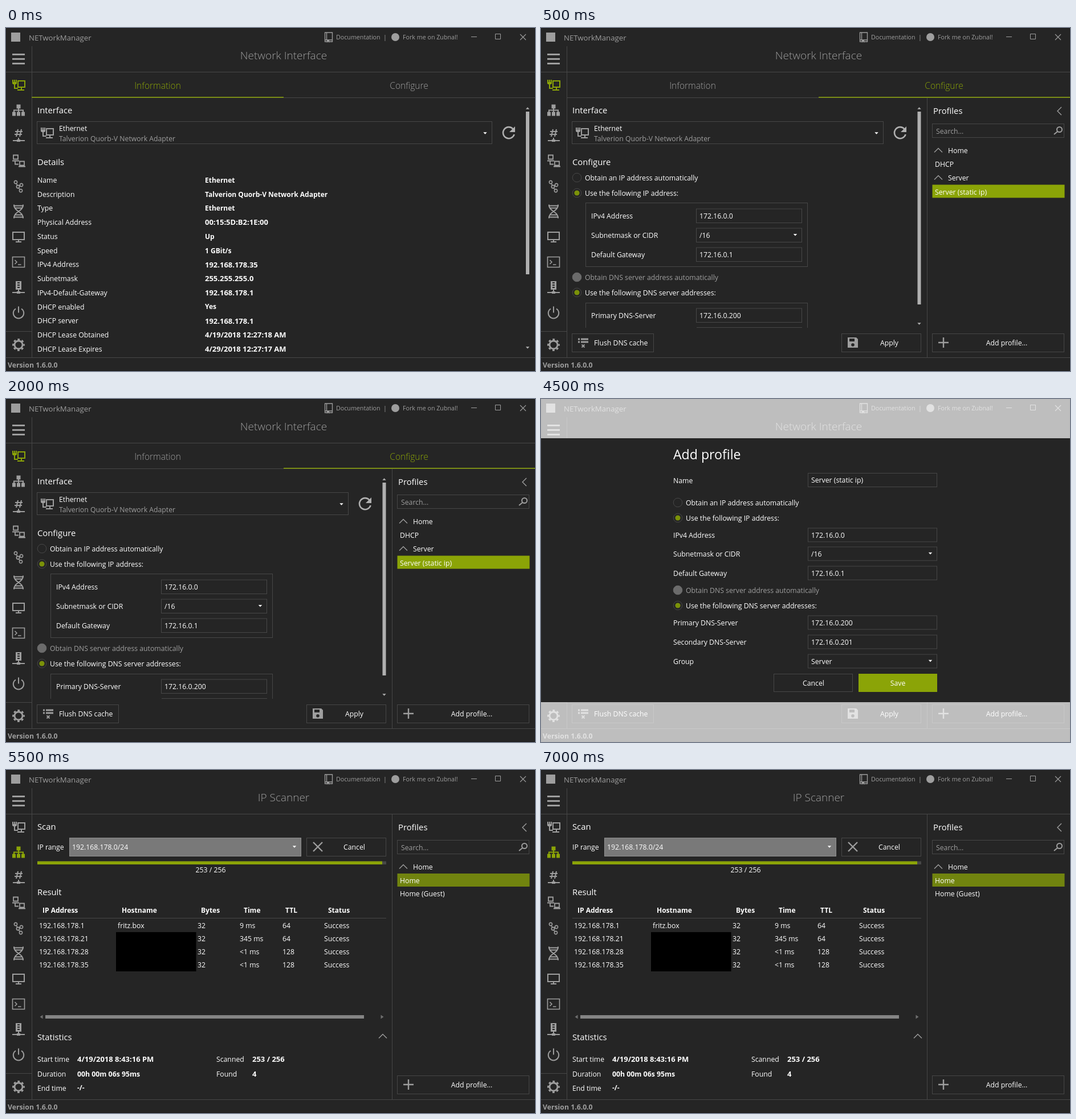
An HTML page that plays this animation: 928 by 603 pixels, repeating every 8 s.

```html
<!DOCTYPE html>
<html lang="en">
<head>
<meta charset="utf-8">
<title>NETworkManager</title>
<style>
  html, body { margin: 0; width: 100%; height: 100%; overflow: hidden; background: #252525; }
  svg { display: block; width: 100%; height: 100%; font-family: "Open Sans", "Noto Sans", sans-serif; }
  text { white-space: pre; }
</style>
</head>
<body>
<svg id="stage" viewBox="0 0 928 603"></svg>
<script>
const BG = '#252525', LINE = '#474747', GRAY = '#9e9e9e', WHITE = '#fff';
const LIME = '#8ba407', LIME_DIM = '#71840f', THUMB = '#b0b0b0';

// y is the vertical middle of the capitals
const text = (x, y, s, { size = 12.25, fill = WHITE, weight = 400, anchor = 'start' } = {}) =>
  `<text x="${x}" y="${y + size * .37}" font-size="${size}" fill="${fill}" font-weight="${weight}" text-anchor="${anchor}">${s.replace('<', '&lt;')}</text>`;
const bold = (x, y, s, size = 12) => text(x, y, s, { size, weight: 700 });
const center = (x, y, s, options) => text(x, y, s, { anchor: 'middle', ...options });
const heading = (x, y, s) => text(x, y, s, { size: 14.8 });
const fillRect = (x1, y1, x2, y2, fill) =>
  `<rect x="${x1}" y="${y1}" width="${x2 - x1}" height="${y2 - y1}" fill="${fill}"/>`;
const box = (x1, y1, x2, y2, fill = 'none', stroke = LINE) =>
  `<rect x="${x1 - .5}" y="${y1 + .5}" width="${x2 - x1}" height="${y2 - y1}" fill="${fill}" stroke="${stroke}"/>`;
const hLine = (x1, x2, y) => fillRect(x1, y, x2, y + 1, LINE);
const vLine = (x, y1, y2) => fillRect(x, y1, x + 1, y2, LINE);
const path = (x, y, d, color = GRAY, width = 2, fill = 'none') =>
  `<path transform="translate(${x} ${y})" d="${d}" fill="${fill}" stroke="${color}" stroke-width="${width}"/>`;
const solid = (x, y, d, color = GRAY) => path(x, y, d, 'none', 0, color);
const ring = (x, y, r = 2.6) => `M${x - r} ${y}a${r} ${r} 0 1 0 ${2 * r} 0a${r} ${r} 0 1 0 ${-2 * r} 0`;

// Each icon: [stroked path, filled path, stroke width]
const icons = {
  adapter: ['M-1-7H11V4H-1zM5 4V8M-2 9H10M-10-9V-3H-4V-9M-7-9V6H-1', 'M-10-5H-4V-1H-10z'],
  sitemap: ['M0-4V4M-8 4V0H8V4', 'M-3.5-10h7v7h-7zM-11 3h6v7h-6zM-3 3h6v7h-6zM5 3h6v7h-6z'],
  hash: ['M-1-11L-4 2M5-11L2 2M-6-7H7M-7-2H6M-10 9H11M0 4V8', 'M-3 7h6v4h-6z'],
  computers: ['M-9-10H-1V-3H-9zM-11 0H1M2 1H10V8H2zM0 10H12M-6 1V6H0', '', 1.8],
  graph: [ring(-5, -7) + ring(5, -2) + ring(-1, 1) + ring(4, 8) + 'M-4-5L-2-1M1 0L3-1M0 3L2.5 6', '', 1.6],
  dna: ['M-8-12C-8 1 8-1 8 12M8-12C8 1-8-1-8 12M-9-10H9M-6-6H6M-6 6H6M-9 10H9', ''],
  monitor: ['M-10-8H10V5H-10zM0 5V9M-5 9H5', ''],
  terminal: ['M-10.5-9H10.5V9H-10.5zM-6.5-3.5L-3 0L-6.5 3.5M-1 4.5H4.5', '', 1.6],
  server: ['M0 2V8M-11 9H11', 'M-5-11H5V4H-5zM-2-9v2h4v-2zM-2-5v2h4v-2zM-2-1v2h4v-2zM-3 7h6v4h-6z'],
  power: ['M-5-7A9.2 9.2 0 1 0 5-7M0-11V0', '']
};
const icon = (name, x, y, color = GRAY) => {
  const [lines, shapes, width] = icons[name];
  return path(x, y, lines, color, width) + solid(x, y, shapes, color);
};

const gear = (x, y) => `<g transform="translate(${x} ${y})" fill="none" stroke="${GRAY}" stroke-width="2.8">
  <circle r="7"/><circle r="9.5" stroke-dasharray="3.8 3.66" stroke-dashoffset="1.9"/></g>`;
const chevronUp = (x, y) => path(x, y, 'M-7 3.5L0-3.5L7 3.5', GRAY, 1.4);
const arrowDown = (x, y, color = WHITE) => solid(x, y, 'M-3.2-1.7H3.2L0 1.8z', color);
const arrowUp = (x, y, color = THUMB) => solid(x, y, 'M-3.2 1.8H3.2L0-1.7z', color);
const refresh = (x, y) => path(x, y, 'M7.5-6.5A10 10 0 1 0 9.6 3', THUMB, 2.6) + solid(x, y, 'M11-11V-1H1z', THUMB);

const input = (x1, y1, x2, y2, s, drop) =>
  box(x1, y1, x2, y2) + text(x1 + 5, (y1 + y2) / 2 + .5, s) + (drop ? arrowDown(x2 - 12, (y1 + y2) / 2) : '');
const button = (x1, y1, x2, y2, s, textX, fill, stroke) =>
  box(x1, y1, x2, y2, fill, stroke) + center(textX, (y1 + y2) / 2 + .5, s);

function radio(x, y, s, state) {
  const off = state === 'disabled';
  return `<circle cx="${x}" cy="${y}" r="7.8" fill="${off ? '#6b6b6b' : 'none'}" stroke="${off ? '#6b6b6b' : LINE}"/>` +
    (state === 'on' ? `<circle cx="${x}" cy="${y}" r="4.6" fill="#7b9209"/>` : '') +
    text(x + 14, y + .7, s, { fill: off ? GRAY : WHITE });
}

function vScroll(x, top, bottom, end) {
  return arrowUp(x, 141) + fillRect(x - 3, top, x + 3, bottom, THUMB) + arrowDown(x, end, THUMB);
}

function frame(title, active) {
  const label = { size: 10.7, fill: GRAY };
  return fillRect(0, 0, 928, 603, BG) + box(1, 0, 928, 602, 'none', '#1b1b1b') +
    fillRect(9, 8, 25, 24, GRAY) +
    text(40, 17, 'NETworkManager', { size: 13.2, fill: GRAY }) +
    path(566, 16, 'M-6.5-8H6.5V5H-6.5zM-6.5 5V8H-3M1 8H6.5V5M-3.5-8V5', GRAY, 1.3) + solid(566, 16, 'M-3 5H1V10L-1 8L-3 10z') +
    text(579, 16, 'Documentation', label) + text(662, 16, '|', label) +
    `<circle cx="683" cy="16" r="7" fill="${GRAY}"/>` +
    text(696, 16, 'Fork me on Zubnal!', label) +
    path(821, 15.5, 'M-5 0H5', GRAY, 1) + path(863, 15, 'M-4.5-4.5H4.5V4.5H-4.5z', GRAY, 1) +
    path(907, 16, 'M-5-5L5 5M5-5L-5 5', GRAY, 1.1) +
    center(487, 48, title, { size: 19, fill: GRAY, weight: 300 }) +
    path(22, 54.5, 'M-11-8H11M-11 0H11M-11 8H11', GRAY, 3) +
    hLine(0, 928, 77) + vLine(45, 32, 579) + hLine(0, 45, 533) + hLine(0, 928, 579) +
    Object.keys(icons).map((name, i) => icon(name, 22, 100 + i * 44.5, i === active ? LIME : GRAY)).join('') +
    gear(22, 557) +
    text(3, 592, 'Version 1.6.0.0', { fill: GRAY, weight: 700 });
}

function tabs(active) {
  const tab = (x, i, s) => center(x, 101, s, { size: 15.5, weight: 300, fill: i === active ? LIME : GRAY });
  const x = active ? 487 : 45;
  return hLine(45, 928, 122) + fillRect(x, 121, active ? 928 : 487, 122.5, LIME) +
    tab(266, 0, 'Information') + tab(707, 1, 'Configure');
}

const adapterPicker = right => heading(55, 145, 'Interface') + box(55, 164, right, 203) +
  icon('adapter', 72, 184) + text(93, 176.5, 'Ethernet') +
  text(93, 194, 'Talverion Quorb-V Network Adapter', { fill: GRAY }) +
  arrowDown(right - 12.5, 185) + refresh(right + 29, 184);

// Rows: [kind, y, label, highlight]
function profiles(top, rows) {
  const row = ([kind, y, s, fill]) => kind === 'group'
    ? chevronUp(697, y) + text(714, y + .5, s)
    : (fill ? fillRect(686.5, y - 12, 918.5, y + 11, fill) : '') + text(691, y + .5, s);
  return vLine(677, top, 579) + heading(688, top + 23, 'Profiles') +
    path(909, top + 23, 'M4-7L-3 0L4 7', GRAY, 1.4) +
    box(687, top + 45, 918, top + 69) + text(693, top + 58, 'Search...', { fill: GRAY }) +
    path(907, top + 57, 'M-1 2L-7 7' + ring(2.5, -1.5, 4.5), GRAY, 2) +
    rows.map(row).join('') +
    button(687, 537, 918, 569, 'Add profile...', 817) + path(706, 553, 'M-9 0H9M0-9V9', GRAY, 2.4);
}

function information() {
  const details = [
    ['Name', 'Ethernet'], ['Description', 'Talverion Quorb-V Network Adapter'], ['Type', 'Ethernet'],
    ['Physical Address', '00:15:5D:B2:1E:00'], ['Status', 'Up'], ['Speed', '1 GBit/s'],
    ['IPv4 Address', '192.168.178.35'], ['Subnetmask', '255.255.255.0'],
    ['IPv4-Default-Gateway', '192.168.178.1'], ['DHCP enabled', 'Yes'], ['DHCP server', '192.168.178.1'],
    ['DHCP Lease Obtained', '4/19/2018 12:27:18 AM'], ['DHCP Lease Expires', '4/29/2018 12:27:17 AM']
  ];
  return frame('Network Interface', 0) + tabs(0) + adapterPicker(853) + heading(55, 236, 'Details') +
    details.map(([name, value], i) => {
      const y = 267.5 + i * 24.72;
      return text(55, y, name) + bold(349, y, value, /\d{2}/.test(value) ? 13 : 12);
    }).join('') +
    vScroll(915, 147, 433, 562);
}

function configure() {
  const fields = [[330, 'IPv4 Address', '172.16.0.0'], [364, 'Subnetmask or CIDR', '/16', true],
    [398, 'Default Gateway', '172.16.0.1'], [505, 'Primary DNS-Server', '172.16.0.200']];
  return frame('Network Interface', 0) + tabs(1) + adapterPicker(601) + heading(55, 236, 'Configure') +
    radio(63, 263, 'Obtain an IP address automatically') +
    radio(63, 290, 'Use the following IP address:', 'on') +
    box(79, 307, 468, 419) +
    fields.map(([y, name, value, drop]) => text(88, y + .5, name) + input(273, y - 12.5, 458, y + 12, value, drop)).join('') +
    radio(63, 438, 'Obtain DNS server address automatically', 'disabled') +
    radio(63, 465, 'Use the following DNS server addresses:', 'on') +
    hLine(78, 468, 483) + vLine(78, 483, 527) + vLine(467, 483, 527) + hLine(273, 458, 526) +
    vScroll(663.5, 147, 486, 520) +
    box(55, 537, 198, 569) + text(93, 553.5, 'Flush DNS cache') +
    path(74, 553, 'M-9-6H-6M-4-6H9M-9-1H-6M-4-1H9', GRAY, 3) + path(74, 559, 'M-2.5-2.5L2.5 2.5M2.5-2.5L-2.5 2.5', GRAY, 1.8) +
    button(528, 537, 667, 569, 'Apply', 611) +
    solid(547, 553, 'M-9-9H6L9-6V9H-9z') + fillRect(541, 546, 550, 551, BG) +
    `<circle cx="547" cy="557" r="2.8" fill="${BG}"/>` +
    profiles(123, [['group', 215, 'Home'], ['item', 239, 'DHCP'], ['group', 263, 'Server'],
      ['item', 287.5, 'Server (static ip)', LIME]]);
}

function addProfile() {
  const fields = [[142.5, 'Name', 'Server (static ip)'], [239, 'IPv4 Address', '172.16.0.0'],
    [272, 'Subnetmask or CIDR', '/16', true], [306, 'Default Gateway', '172.16.0.1'],
    [393, 'Primary DNS-Server', '172.16.0.200'], [427, 'Secondary DNS-Server', '172.16.0.201'],
    [461, 'Group', 'Server', true]];
  return configure() + '<rect width="928" height="603" fill="#fff" opacity=".7"/>' +
    fillRect(0, 69, 928, 533, BG) + text(232, 97, 'Add profile', { size: 23.1 }) +
    fields.map(([y, name, value, drop]) => text(232, y + .7, name) + input(469, y - 12.5, 695, y + 11.5, value, drop)).join('') +
    radio(240, 182, 'Obtain an IP address automatically') +
    radio(240, 209, 'Use the following IP address:', 'on') +
    radio(240, 336, 'Obtain DNS server address automatically', 'disabled') +
    radio(240, 363, 'Use the following DNS server addresses:', 'on') +
    button(409, 483, 547, 514, 'Cancel', 478) + button(558, 483, 695, 514, 'Save', 626, LIME, LIME);
}

function scanner() {
  const columns = [58, 196, 336, 410, 485, 558];
  const heads = [[64, 'IP Address'], [203, 'Hostname'], [342, 'Bytes'], [417, 'Time'], [490, 'TTL'], [565, 'Status']];
  const hosts = [['1', 'fritz.box', '9 ms', '64'], ['21', '', '345 ms', '64'], ['28', '', '<1 ms', '128'], ['35', '', '<1 ms', '128']];
  return frame('IP Scanner', 1) + heading(55, 99.5, 'Scan') + text(55, 135.5, 'IP range') +
    box(112, 119, 518, 151, '#797979', '#8f8f8f') + text(116, 135.5, '192.168.178.0/24') + arrowDown(506, 135) +
    button(528, 119, 667, 151, 'Cancel', 611) + path(547, 135, 'M-8-8L8 8M8-8L-8 8', GRAY, 2.4) +
    fillRect(55, 160.5, 667, 166, LINE) + fillRect(55, 160.5, 660, 166, LIME) +
    center(359, 175.5, '253 / 256') + heading(55, 214.5, 'Result') +
    heads.map(([x, s]) => bold(x, 247, s)).join('') + hLine(55, 667, 260) +
    hosts.map(([ip, host, time, ttl], i) =>
      [`192.168.178.${ip}`, host, '32', time, ttl, 'Success'].map((s, c) => text(columns[c], 273 + i * 23.2, s)).join('')
    ).join('') +
    fillRect(193, 285, 333.5, 354, '#000') +
    fillRect(69, 431, 628, 437, '#848484') +
    solid(62, 434, 'M2.5-3.5V3.5L-2.5 0z', '#6e6e6e') + solid(660, 434, 'M-2.5-3.5V3.5L2.5 0z', '#6e6e6e') +
    heading(55, 469.5, 'Statistics') + chevronUp(661, 468) +
    text(55, 508.5, 'Start time') + bold(125, 508.5, '4/19/2018 8:43:16 PM', 13) +
    text(55, 534, 'Duration') + bold(125, 534, '00h 00m 06s 95ms', 12.3) +
    text(55, 559, 'End time') + bold(125, 559, '-/-') +
    text(369, 508.5, 'Scanned') + bold(432, 508.5, '253 / 256', 13) +
    text(369, 534, 'Found') + bold(432, 534, '4', 13) +
    profiles(78, [['group', 170, 'Home'], ['item', 194, 'Home', LIME_DIM], ['item', 217, 'Home (Guest)']]);
}

const scenes = [[0, information], [500, configure], [3000, addProfile], [5500, scanner]];
const stage = document.getElementById('stage');
let shown;

function draw() {
  const time = performance.now() % 8000;
  const [, scene] = scenes.findLast(([start]) => time >= start);
  if (scene !== shown) stage.innerHTML = (shown = scene)();
  requestAnimationFrame(draw);
}
draw();
</script>
</body>
</html>
```
